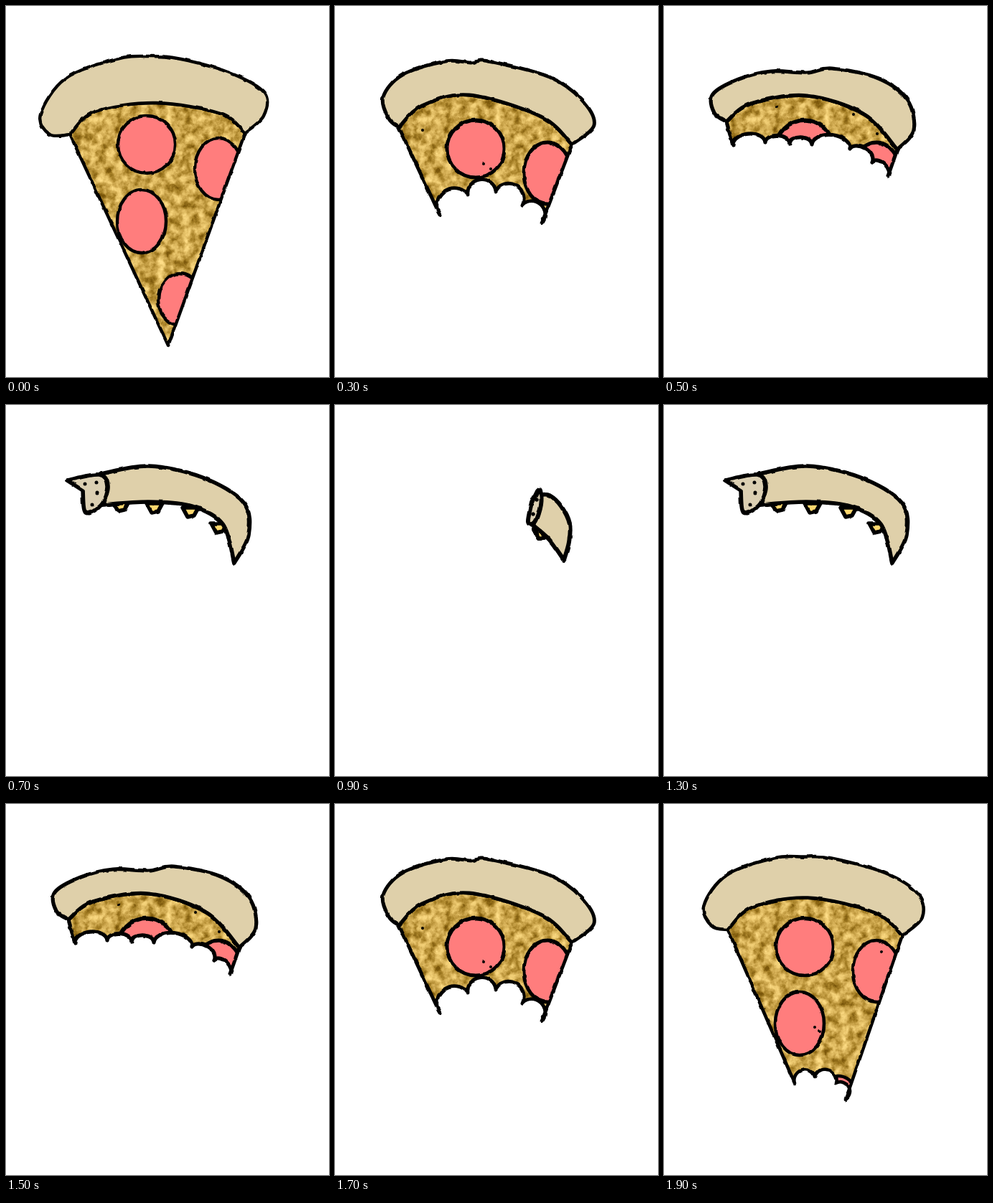
An HTML page that plays this animation: 450x517 px, repeating every 2000 ms.

```html
<!DOCTYPE html>
<html lang="en">
<head>
<meta charset="utf-8">
<title>Pizza slice</title>
<style>
  html, body { margin: 0; width: 100%; height: 100%; overflow: hidden; background: #fff; }
  svg { display: block; width: 100%; height: 100%; }
  path, ellipse { stroke: #000; stroke-linejoin: round; stroke-linecap: round; }
  .crust { fill: #dfd0aa; }
  .face { fill: #dbcfb2; }
  .pep { fill: #ff7d7d; }
  .crumb { fill: #ffd76e; }
  .line { fill: none; }
  .cheese { fill: #c9a54b; stroke: none; }
</style>
</head>
<body>
<svg id="stage" viewBox="0 0 450 517" xmlns="http://www.w3.org/2000/svg">
  <defs>
    <filter id="rough" filterUnits="userSpaceOnUse" x="0" y="0" width="450" height="517" color-interpolation-filters="sRGB">
      <feTurbulence type="fractalNoise" baseFrequency=".09" numOctaves="1" seed="4"/>
      <feDisplacementMap in="SourceGraphic" scale="3.5" xChannelSelector="R" yChannelSelector="G"/>
    </filter>
    <filter id="baked" filterUnits="userSpaceOnUse" x="0" y="0" width="450" height="517" color-interpolation-filters="sRGB">
      <feTurbulence type="fractalNoise" baseFrequency=".085" numOctaves="5" seed="9"/>
      <feColorMatrix values="1.5 0 0 0 -.25  1.5 0 0 0 -.25  1.5 0 0 0 -.25  0 0 0 0 1"/>
      <feComponentTransfer>
        <feFuncR type="table" tableValues=".48 .65 .8 .92 1"/>
        <feFuncG type="table" tableValues=".34 .5 .65 .78 .87"/>
        <feFuncB type="table" tableValues=".04 .15 .3 .43 .53"/>
      </feComponentTransfer>
      <feComposite in2="SourceAlpha" operator="in"/>
    </filter>
  </defs>
</svg>
<script>
const NS = "http://www.w3.org/2000/svg";
const stage = document.getElementById("stage");
const LOOP = 2000, STEP = 100, OUTER = 11;

const pts = text => {
  const n = text.split(" ").map(Number);
  return n.filter((_, i) => i % 2 === 0).map((x, i) => [x, n[2 * i + 1]]);
};
const mix = (a, b, t) => a.map((p, i) => p.map((v, k) => v + (b[i][k] - v) * t));

// Crust at three stages of wear: the outer edge, then the middle of the inner arc.
const crusts = [
  "90 178 62 178 49 150 84 100 155 73 200 69 245 73 315 93 361 120 360 152 334 176 300 149 210 134 125 146",
  "90 168 76 156 68 126 95 95 155 76 190 78 215 76 300 98 345 130 362 165 331 192 288 153 188 123 122 138",
  "88 160 71 148 69 122 105 101 150 90 200 92 235 86 300 100 340 130 349 172 326 199 280 150 200 124 122 135"
].map(pts);

// Centre and radii.
const peps = [[197, 192, 40, 40], [297, 226, 33, 43], [190, 299, 34, 44], [243, 408, 30, 36]];

// Teeth run right to left; dig is the depth of a bite relative to its width.
const slices = [
  { wear: 0, teeth: "227 472" },
  { wear: .4, dig: .48, teeth: "254 411 240 388 211 379 183 388", specks: "211 310 218 316 303 205" },
  { wear: .1, dig: .48, teeth: "278 342 248 324 212 324 163 338" },
  { wear: 1, dig: .48, teeth: "289 302 262 276 225 257 186 262 147 290", specks: "124 172 208 219 218 226" },
  { wear: 1.5, dig: .4, teeth: "304 264 281 243 245 232 208 222 172 222 127 246" },
  { wear: 2, dig: .31, teeth: "313 236 291 216 260 198 207 192 176 191 142 189 97 193", specks: "158 139 265 150 298 177" },
  { wear: 2.1, dig: .25, teeth: "319 220 294 190 262 171 216 162 172 160 136 164 100 172" }
];

// The bare crust shrinks from the first of these shapes to the last.
const ends = {
  outer: ["133 95 200 84 275 100 332 135 339 180 319 219", "288 124 300 125 316 140 328 165 327 190 320 215"],
  inner: ["319 219 303 165 260 140 200 134 135 138", "320 215 304 192 294 181 286 174 276 166"],
  face: ["86 104 131 96 143 112 134 138 112 149 108 118", "283 119 287 118 288 138 280 162 270 162 275 135"],
  crumbs: ["160 141 207 143 257 149 297 171", "288 179 288 179 288 179 288 179"],
  specks: ["111 109 127 107 128 121 121 138", "282 130 282 130 277 151 277 151"]
};

// Smooth curve through the points, starting at the first.
function curve(p) {
  let d = "";
  for (let i = 0; i + 1 < p.length; i++) {
    const a = p[i], b = p[i + 1], before = p[i - 1] || a, after = p[i + 2] || b;
    const c1 = a.map((v, k) => v + (b[k] - before[k]) / 6);
    const c2 = b.map((v, k) => v - (after[k] - a[k]) / 6);
    d += `C${c1} ${c2} ${b}`;
  }
  return d;
}

function bites(teeth, dig) {
  return teeth.slice(1).map(([x, y], i) => {
    const dx = x - teeth[i][0], dy = y - teeth[i][1], width = Math.hypot(dx, dy);
    const tilt = Math.atan2(dy, dx) * 180 / Math.PI;
    return `A${width / 2} ${width * dig} ${tilt} 0 0 ${x} ${y}`;
  }).join("");
}

function add(parent, tag, attrs) {
  const el = document.createElementNS(NS, tag);
  for (const key in attrs) el.setAttribute(key, attrs[key]);
  return parent.appendChild(el);
}

const shape = (g, kind, d) => add(g, "path", { class: kind, d });
const speckle = (g, list, r) => list.forEach(([cx, cy]) => add(g, "circle", { cx, cy, r }));

function drawing(step) {
  return add(stage, "g", {
    filter: "url(#rough)", display: "none", transform: "translate(-1 1)", "stroke-width": 4.4 + step * .17
  });
}

function buildSlice(pose, step) {
  const g = drawing(step);
  const stage0 = Math.min(1, Math.floor(pose.wear));
  const rim = mix(crusts[stage0], crusts[stage0 + 1], pose.wear - stage0);
  const outer = rim.slice(0, OUTER);
  const left = outer[0], right = outer[OUTER - 1];
  const arc = [right, ...rim.slice(OUTER), left];
  const teeth = pts(pose.teeth);
  const body = `M${right}L${teeth[0]}${bites(teeth, pose.dig)}L${left}${curve([...arc].reverse())}Z`;

  const clip = add(g, "clipPath", { id: "slice" + step });
  add(clip, "path", { d: body });
  shape(g, "cheese", body).setAttribute("filter", "url(#baked)");
  const toppings = add(g, "g", { "clip-path": `url(#slice${step})` });
  const drop = step ? 6 : 0;
  for (const [cx, cy, rx, ry] of peps)
    add(toppings, "ellipse", { class: "pep", cx, cy: cy + drop, rx, ry });
  shape(g, "line", body);
  shape(g, "crust", `M${left}${curve(outer)}${curve(arc)}Z`);
  if (pose.specks) speckle(g, pts(pose.specks), 2);
  return g;
}

function buildEnd(t, step) {
  const g = drawing(step);
  const at = {};
  for (const key in ends) at[key] = mix(...ends[key].map(pts), t);
  for (const [x, y] of at.crumbs)
    shape(g, "crumb", `M${x - 10} ${y - 7}l7 13 9 -2 6 -11Z`);
  shape(g, "crust", `M${at.outer[0]}${curve(at.outer)}${curve(at.inner)}Z`);
  shape(g, "face", `M${at.face[0]}${curve(at.face)}Z`);
  speckle(g, at.specks, 2.5);
  return g;
}

const groups = slices.map(buildSlice);
for (const t of [0, .5, 1]) groups.push(buildEnd(t, groups.length));

const start = performance.now();
let shown;

// Eaten bite by bite until nothing is left, then played backwards.
function draw(now) {
  const step = Math.floor((Math.max(0, now - start) % LOOP) / STEP);
  const index = Math.min(step, LOOP / STEP - step);
  if (index !== shown) {
    groups.forEach((g, i) => g.setAttribute("display", i === index ? "inline" : "none"));
    shown = index;
  }
  requestAnimationFrame(draw);
}
draw(start);
</script>
</body>
</html>
```
